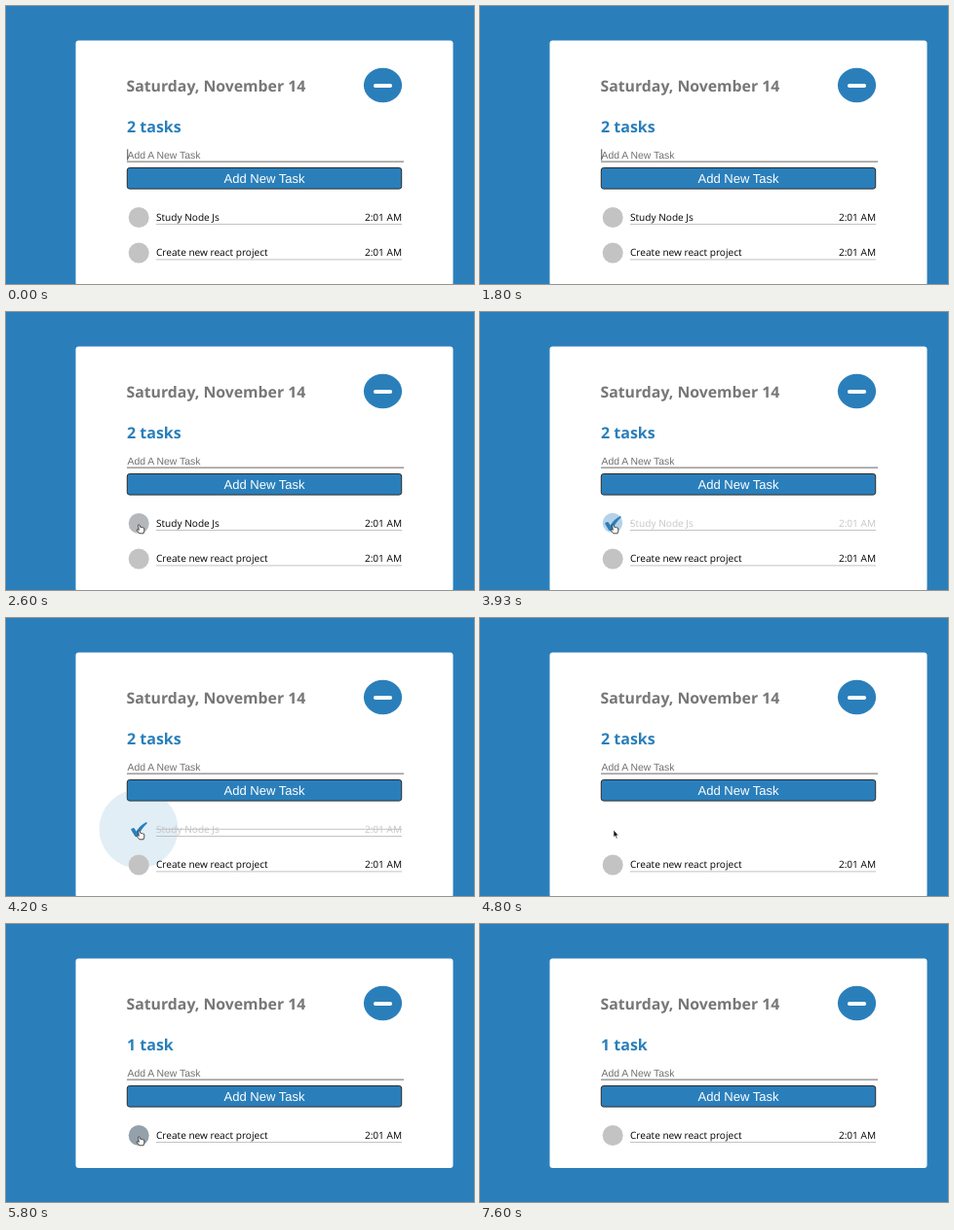
An HTML page that plays this animation: 480x286 px, repeating every 7990 ms.

```html
<!DOCTYPE html>
<html lang="en">
<head>
<meta charset="utf-8">
<title>Task list</title>
<style>
  html, body { margin: 0; width: 100%; height: 100%; overflow: hidden; background: #2a7fbb; }
  svg { display: block; width: 100%; height: 100%; }
  text { white-space: pre; text-rendering: geometricPrecision; }
  .head { font: bold 15.8px "Open Sans", "Noto Sans", sans-serif; fill: #777; }
  .count { font-size: 16px; fill: #2a7fbb; }
  .row text { font: 10.1px "Open Sans", "Noto Sans", sans-serif; fill: #000; }
  .row .end { text-anchor: end; }
  .row.done text { fill: #c6c6c6; }
  .form { font-family: "Liberation Sans", Arial, sans-serif; }
</style>
</head>
<body>
<svg viewBox="0 0 480 286" preserveAspectRatio="none">
  <rect width="480" height="286" fill="#2a7fbb"/>
  <rect id="card" x="71.5" y="35.5" width="387" height="252" rx="3" fill="#fff"/>
  <text class="head" x="123.5" y="88">Saturday, November 14</text>
  <ellipse cx="386.5" cy="81.5" rx="19.6" ry="17.8" fill="#2a7fbb"/>
  <rect x="377" y="80" width="19" height="4" rx="1.8" fill="#fff"/>
  <text id="count" class="head count" x="124" y="130">2 tasks</text>

  <g class="form">
    <text x="124.5" y="156.8" font-size="10.4" fill="#707070">Add A New Task</text>
    <rect id="caret" x="124.4" y="147.3" width="0.8" height="11.5" fill="#222"/>
    <rect x="124" y="159.6" width="284" height="1" fill="#666"/>
    <rect x="124.3" y="166.5" width="281.4" height="21.6" rx="2.5" fill="#2a7fbb" stroke="#2b2b2b"/>
    <text x="265" y="182" font-size="13" fill="#fff" text-anchor="middle">Add New Task</text>
  </g>

  <g id="first" class="row">
    <circle id="ripple" cx="136" cy="217" fill="#2a7fbb"/>
    <rect x="154" y="224" width="252" height="0.8" fill="#b4b4b4"/>
    <text x="154" y="220.7">Study Node Js</text>
    <text class="end" x="406" y="220.7">2:01 AM</text>
    <rect id="strike" x="154" y="216.8" width="0" height="0.9" fill="#bdbdbd"/>
    <circle id="dot1" cx="136.2" cy="217.5" r="10.5"/>
    <path id="tick" d="M128 217.6Q129.8 215.2 131.6 216.2L133.6 219.4Q138 212.8 143.8 210L145 210.9Q139.4 216 135.3 224.2Q133.7 225.7 132.2 224.5Z" fill="#2a7fbb"/>
  </g>
  <g id="second" class="row">
    <rect x="154" y="224" width="252" height="0.8" fill="#b4b4b4"/>
    <text x="154" y="220.7">Create new react project</text>
    <text class="end" x="406" y="220.7">2:01 AM</text>
    <circle id="dot2" cx="136.2" cy="217.5" r="10.5"/>
  </g>

  <g id="cursor" stroke-linejoin="round">
    <path id="arrow" d="M0 0V7.6L1.7 6.1L2.9 8.9L4.1 8.4L2.9 5.7H5.1Z" fill="#111" stroke="#fff" stroke-width="0.6"/>
    <path id="hand" d="M-1.4 1.2Q-.6 .4 .1 1.3L1 3.6Q1.8 3 2.4 3.7Q3.2 3.2 3.7 4Q4.7 3.8 4.8 5V7.2L4.1 9.8H-.1L-2.7 6.8Q-3 5.6-1.9 5.6L-.7 6.4Z" fill="#fff" stroke="#222" stroke-width="0.8"/>
  </g>
</svg>
<script>
const LOOP = 7990, ROW = 36.5;
const CLICK = 3930, SLIDE = 4250, GONE = 4800, REMOVED = 5200;
const CARET_ON = [[0, 330], [870, 1330], [1800, 2330], [2870, 3330]];
// time, x, y
const PATH = [
  [1860, 398, 83], [2050, 340, 112], [2250, 235, 165], [2420, 160, 207], [2530, 137, 218],
  [7290, 137, 218], [7400, 105, 180], [7530, 32, 95]
];

const $ = id => document.getElementById(id);
const set = (id, attrs) => Object.entries(attrs).forEach(([k, v]) => $(id).setAttribute(k, v));
const show = (id, on) => { $(id).style.display = on ? '' : 'none'; };
const within = (t, a, b) => t >= a && t < b;
const part = (t, a, b) => Math.min(1, Math.max(0, (t - a) / (b - a)));
const mix = (a, b, p) => a + (b - a) * p;
const easeOut = p => 1 - (1 - p) ** 2;

const REST = [195, 195, 195], HOVER = [148, 160, 170];
const dotColor = p => `rgb(${REST.map((c, i) => Math.round(mix(c, HOVER[i], p)))})`;

function cursorAt(t) {
  const i = Math.max(1, PATH.findIndex(k => k[0] > t));
  const [a, b] = [PATH[i - 1], PATH[i]];
  const p = part(t, a[0], b[0]);
  return [mix(a[1], b[1], p), mix(a[2], b[2], p)];
}

function drawCursor(t) {
  const visible = within(t, PATH[0][0], 7590);
  show('cursor', visible);
  if (!visible) return;
  const [x, y] = cursorAt(Math.min(t, 7529));
  const hand = within(t, 2500, 4420) || within(t, REMOVED, 7330);
  set('cursor', { transform: `translate(${x} ${y})` });
  show('hand', hand);
  show('arrow', !hand);
}

function drawFirstRow(t) {
  const done = t >= CLICK;
  show('first', t < GONE);
  $('first').classList.toggle('done', done);
  show('dot1', !done);
  show('tick', done);
  set('dot1', { fill: dotColor(part(t, 2470, 2870)) });
  set('strike', { width: 252 * easeOut(part(t, CLICK, 4150)) });
  set('ripple', {
    r: done ? mix(10, 44, easeOut(part(t, CLICK, 4330))) : 0,
    opacity: mix(0.32, 0, part(t, CLICK, 4330)) + 0.03 * within(t, CLICK, 4330)
  });
  const slide = part(t, SLIDE, GONE) ** 1.7;
  set('first', { transform: `translate(${370 * slide} 0)`, opacity: 1 - 0.8 * slide });
}

function render(t) {
  const removed = t >= REMOVED;
  show('caret', CARET_ON.some(([a, b]) => within(t, a, b)));
  drawFirstRow(t);
  // The second list entry returns with the start of the loop.
  $('count').textContent = removed ? '1 task' : '2 tasks';
  set('card', { height: removed ? 215.5 : 252 });
  set('second', { transform: `translate(0 ${removed ? 0 : ROW})` });
  set('dot2', { fill: dotColor(part(t, REMOVED - 60, 5400) - part(t, 7330, 7590)) });
  drawCursor(t);
}

const start = performance.now();
function tick() {
  render((performance.now() - start) % LOOP);
  requestAnimationFrame(tick);
}
tick();
</script>
</body>
</html>
```
